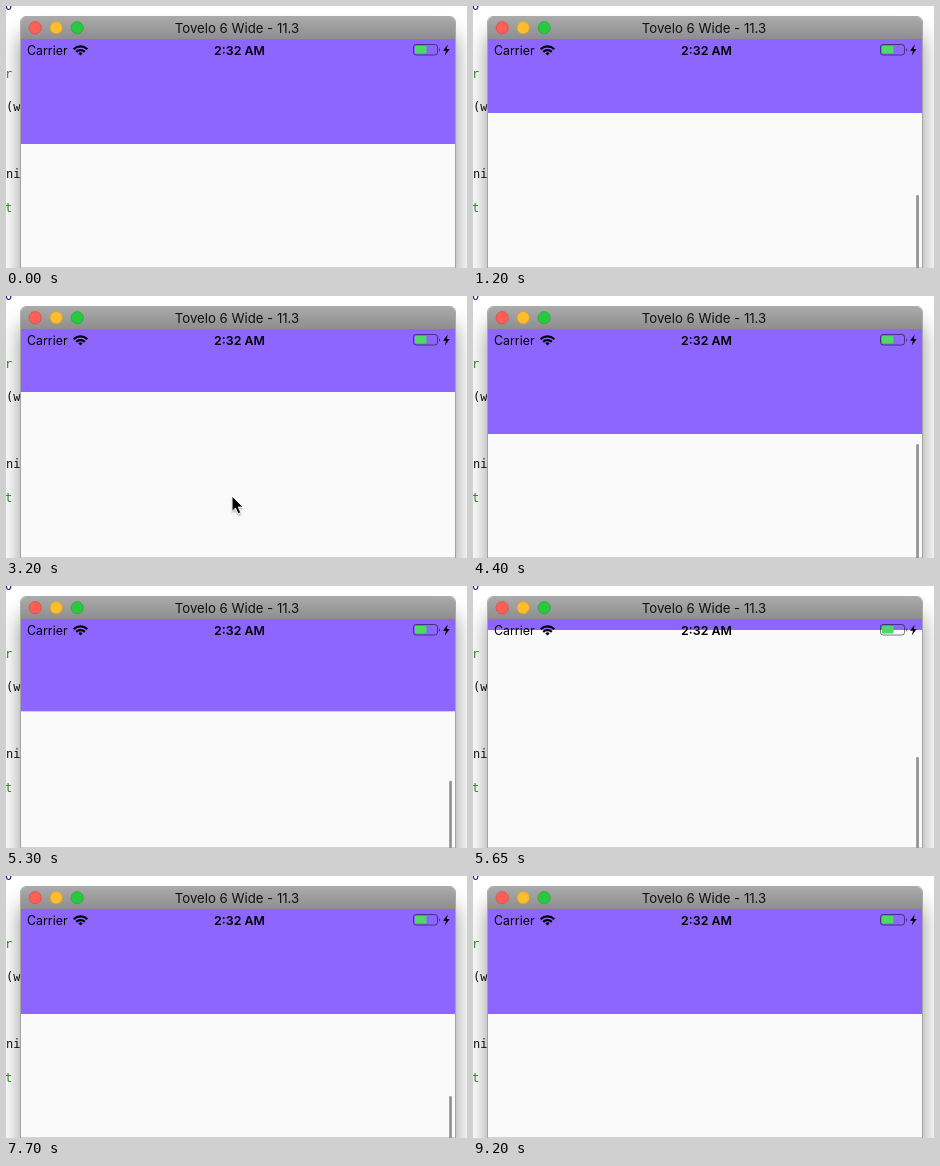
Animation of 461 by 262 pixels, one loop 9250 ms. Source, as an HTML page:

```html
<!DOCTYPE html>
<html lang="en">
<head>
<meta charset="utf-8">
<title>Collapsing header</title>
<style>
  html, body { margin: 0; width: 100%; height: 100%; overflow: hidden; background: #fff; }
  svg { display: block; width: 100%; height: 100%; }
  .ui { font-family: Inter, Roboto, sans-serif; font-size: 12.4px; }
  .code { font: 12px "DejaVu Sans Mono", monospace; }
</style>
</head>
<body>
<svg viewBox="0 0 461 262" xmlns="http://www.w3.org/2000/svg">
  <defs>
    <linearGradient id="title" x1="0" y1="0" x2="0" y2="1">
      <stop offset="0" stop-color="#aaa"/>
      <stop offset="1" stop-color="#8e8e8e"/>
    </linearGradient>
    <filter id="shadow" x="-20%" y="-20%" width="140%" height="140%">
      <feGaussianBlur stdDeviation="11"/>
    </filter>
    <filter id="soft" x="-50%" y="-50%" width="200%" height="200%">
      <feGaussianBlur stdDeviation="1"/>
    </filter>
  </defs>

  <rect width="461" height="262" fill="#fff"/>
  <g class="code">
    <text x="-1" y="4" fill="#1c1c8c">0</text>
    <text x="-1" y="72" fill="#2d8a22">r</text>
    <text x="0" y="105" fill="#111">(w</text>
    <text x="0" y="172" fill="#111">ni</text>
    <text x="-1" y="206" fill="#2d8a22">t</text>
  </g>
  <rect x="15" y="30" width="434" height="300" fill="#000" opacity=".45" filter="url(#shadow)"/>

  <path d="M14.5 262V16a5.5 5.5 0 0 1 5.5-5.5H444a5.5 5.5 0 0 1 5.5 5.5V262Z" fill="#fafafa" stroke="#8b8b8b" stroke-opacity=".7"/>
  <path d="M15 33V16a5 5 0 0 1 5-5H444a5 5 0 0 1 5 5V33Z" fill="url(#title)"/>
  <g stroke-width=".7">
    <circle cx="29.2" cy="21.7" r="6.1" fill="#ff5f57" stroke="#e0443e"/>
    <circle cx="50.2" cy="21.7" r="6.1" fill="#ffbd2e" stroke="#dea123"/>
    <circle cx="71.2" cy="21.7" r="6.1" fill="#28c940" stroke="#1dad2b"/>
  </g>
  <text class="ui" x="231" y="27" text-anchor="middle" style="font-size:13.2px" fill="#111">Tovelo 6 Wide - 11.3</text>

  <rect id="header" x="15" y="33" width="434" height="105" fill="#8c66ff"/>

  <g class="ui" fill="#000">
    <text x="21" y="49">Carrier</text>
    <text x="233.5" y="49" text-anchor="middle" font-weight="600">2:32 AM</text>
  </g>
  <g fill="none" stroke="#000" stroke-width="2.2">
    <path d="M67.7 43.2a9.8 9.8 0 0 1 13.6 0"/>
    <path d="M70.2 45.9a6.2 6.2 0 0 1 8.6 0"/>
  </g>
  <path d="M74.5 49.6l-2.1-2.2a3 3 0 0 1 4.2 0Z"/>
  <rect x="407.5" y="38.5" width="24" height="10.5" rx="2.6" fill="none" stroke="#000" stroke-opacity=".5"/>
  <path d="M433 42.2a1.8 1.8 0 0 1 0 3.4Z" fill-opacity=".5"/>
  <rect x="409" y="40" width="11.5" height="7.5" rx="1" fill="#4cd964"/>
  <path d="M441.8 38.5l-4.8 6.2h3l-1.2 4.8 4.9-6.4h-3Z"/>

  <rect id="bar" x="443.2" width="2.7" height="150" rx="1.3" fill="#929294"/>

  <g id="cursor">
    <path d="M0 1.5v16l3.7-3.5 2.6 6 2.8-1.2-2.6-5.8h5Z" opacity=".35" filter="url(#soft)"/>
    <path d="M0 0v15.4l3.5-3.3 2.5 5.8 2.8-1.2-2.5-5.6h4.9Z" fill="#000" stroke="#fff" stroke-width="1"/>
  </g>
</svg>
<script>
  const LOOP = 9250, STEP = 50, TOP = 33;
  const $ = id => document.getElementById(id);
  const header = $('header'), bar = $('bar'), cursor = $('cursor');

  // Tracks are [time, value] pairs.
  const edge = [[900, 138], [1200, 107], [1350, 62], [1500, 33], [3000, 33], [3150, 82], [3350, 138],
    [5250, 138], [5400, 100], [5650, 44], [5800, 33], [6700, 33], [6850, 82], [7050, 138]];
  // Scroll indicator distance below the header
  const scroll = [[800, 10], [1000, 34], [1200, 82], [1500, 150], [1800, 178], [2100, 190], [3350, 190],
    [3900, 60], [4150, 24], [4400, 10], [4900, 10], [5250, 60], [5400, 88], [5650, 127], [7050, 127],
    [7600, 96], [8000, 40], [8400, 10]];
  const fade = [[700, 0], [800, 1], [2300, 1], [2550, 0], [3300, 0], [3400, 1], [5900, 1], [6150, 0],
    [7000, 0], [7100, 1], [8700, 1], [8950, 0]];
  const pointer = [[2450, 270], [2850, 137], [3000, 137], [3150, 186], [3350, 242], [3500, 280],
    [5950, 280], [6450, 137], [6700, 137], [6850, 186], [7050, 242], [7200, 280]];

  function at(track, t) {
    const i = track.findIndex(k => k[0] > t);
    if (i === 0) return track[0][1];
    if (i < 0) return track[track.length - 1][1];
    const [t0, a] = track[i - 1], [t1, b] = track[i];
    return a + (b - a) * (t - t0) / (t1 - t0);
  }

  function draw(t) {
    const y = at(edge, t);
    header.setAttribute('height', y - TOP);
    bar.setAttribute('y', y + at(scroll, t));
    bar.setAttribute('opacity', at(fade, t));
    cursor.setAttribute('transform', `translate(226 ${at(pointer, t)})`);
  }

  const start = performance.now();
  function tick() {
    const t = (performance.now() - start) % LOOP;
    draw(Math.floor(t / STEP) * STEP);
    requestAnimationFrame(tick);
  }
  draw(0);
  requestAnimationFrame(tick);
</script>
</body>
</html>
```
